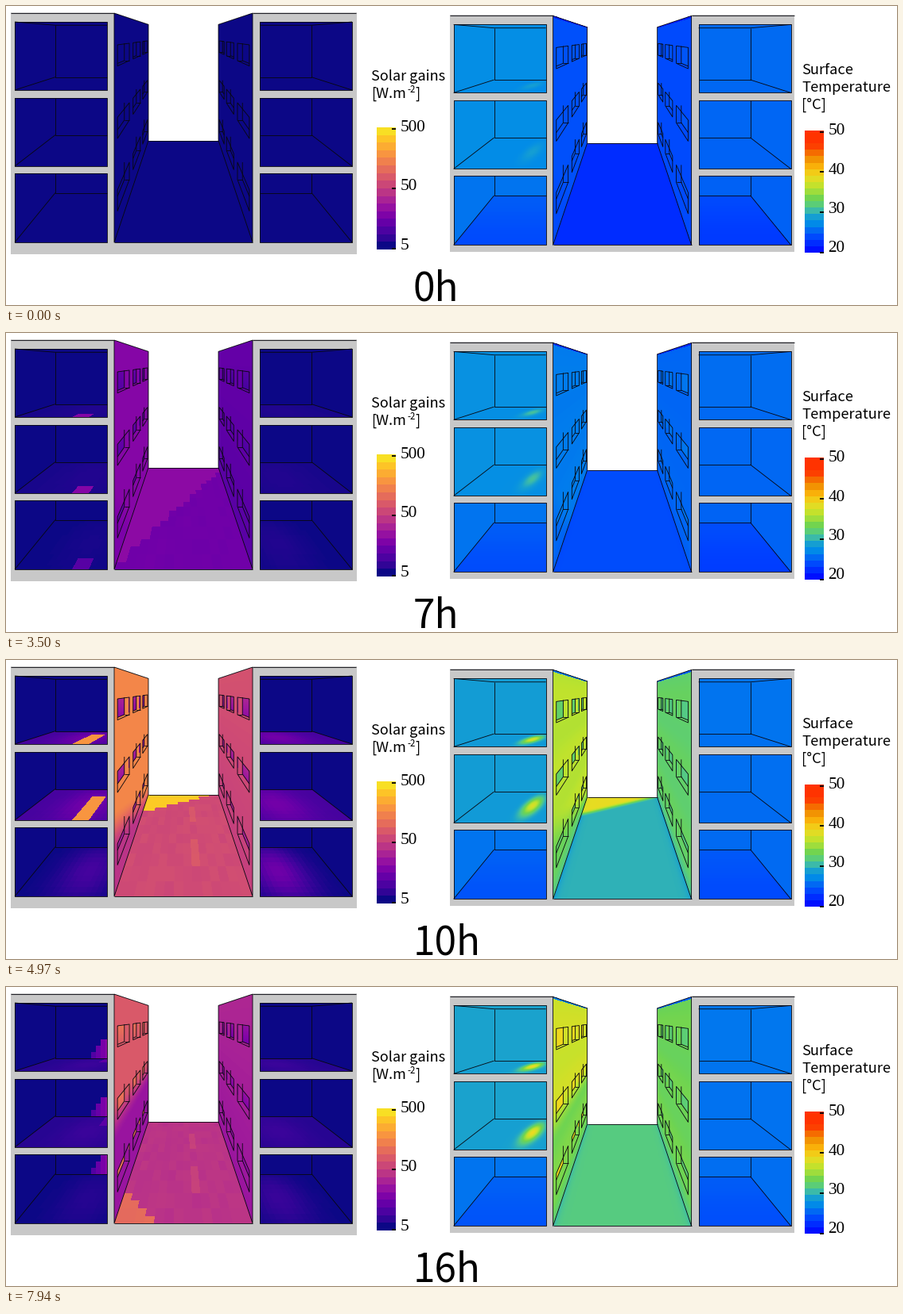
These frames come from a looping animation (1120 px wide and 377 px high, 8000 ms). A matplotlib script:

```python
import numpy as np
import matplotlib.pyplot as plt
from matplotlib.animation import FuncAnimation
from matplotlib.collections import LineCollection
from matplotlib.colors import LinearSegmentedColormap

W, H, DPI = 1120, 377, 100
STEP, LOOP = 20, 8000
# The hours advance in an uneven short/long rhythm
CHANGES = np.cumsum([530, 460] * 4 + [460, 550] + [460, 530] * 3)
SHIFT = (551.6, 3.4)                 # right panel relative to the left one
GRAY = (0.785, 0.785, 0.785)
INK = (0.03, 0.03, 0.06)

# One-point perspective: vanishing point, street half width and depths
VX, VY = 223, 38
HALF, GROUND, ROOF = 87, 260, -29
FAR, ROOM_FAR = 1.976, 1.316
IN, OUT = 96, 212                    # room sides measured from the centre
WINDOWS = [(1.05 + 0.325 * i, 1.28 + 0.325 * i) for i in range(3)]
WIN_TOP, WIN_H, RECESS, STOREY = 11.5, 28, 95, 96

SOLAR_BANDS = 16
plasma = plt.get_cmap("plasma")
thermal = LinearSegmentedColormap.from_list("thermal", [
    (0, "#0005ff"), (.12, "#0045ff"), (.24, "#028ce8"), (.295, "#17a0d1"),
    (.345, "#3bbaab"), (.39, "#57cc80"), (.45, "#6ed452"), (.55, "#bde32e"),
    (.64, "#eddb21"), (.72, "#fab50a"), (.8, "#f08a00"), (.91, "#ff3300"),
    (1, "#ff3300")], 512)

# Geometry on the pixel grid of one panel
X, Y = np.meshgrid(np.arange(435) + 6.5, np.arange(305) + 8.5)
DX = np.maximum(abs(X - VX), 0.5)
LEFT = X < VX

wall_z = HALF / DX
wall_y = (Y - VY) * wall_z
WALL = (DX < HALF) & (wall_z < FAR) & (wall_y > ROOF) & (wall_y < GROUND)

street_z = GROUND / np.maximum(Y - VY, 1)
street_u = (X - VX) * street_z / HALF
STREET = (abs(street_u) < 1) & (street_z > 1) & (street_z < FAR)


def window_mask(depth):
    z = depth / DX
    y = (Y - VY) * z
    in_z = np.any([(z > a) & (z < b) for a, b in WINDOWS], axis=0)
    return in_z & (y > 0) & ((y - WIN_TOP) % STOREY < WIN_H)


PANE = WALL & window_mask(HALF) & window_mask(RECESS)


class Room:
    def __init__(self, storey):
        self.storey = storey
        self.top, self.bottom = 20 + 95.5 * storey, 106 + 96 * storey
        depth = self.bottom - VY
        self.back = VY + depth / ROOM_FAR
        self.z = depth / np.maximum(Y - VY, 1)
        self.r = DX * self.z
        self.box = (DX > IN) & (DX < OUT) & (Y > self.top) & (Y < self.bottom)
        self.floor = self.box & (self.z < ROOM_FAR) & (self.r < OUT)


ROOMS = [Room(k) for k in range(3)]
INDOORS = np.any([room.box for room in ROOMS], axis=0)
SKY = (DX < HALF) & ~WALL & ~STREET & (Y < VY + GROUND)
NOISE = np.random.default_rng(4).uniform(-1, 1, (64, 64))


def snap(a, step):
    return np.floor(a / step) * step + step / 2


def cell_noise(a, b, da, db):
    return NOISE[np.floor(a / da).astype(int) % 64,
                 np.floor(b / db).astype(int) % 64]


def smooth(a):
    a = np.clip(a, 0, 1)
    return a * a * (3 - 2 * a)


def blob(a, b):
    return np.exp(-(a * a + b * b))


def dawn(hour):
    return np.clip((hour - 6) / 2, 0, 1)


def arc(hour, noon, drop):
    """Daylight level: a parabola around midday, zero before dawn."""
    return dawn(hour) * (noon - drop * ((hour - 11.6) / 4) ** 2)


def heat(hour, peak=13.2, width=5.5):
    """Stored warmth, rising after sunrise and peaking past noon."""
    rise = np.clip((hour - 5.6) / 2.4, 0, 1)
    return rise * np.exp(-((hour - peak) / width) ** 2)


def sun_edge(hour, u):
    """Depth beyond which the street is sunlit."""
    t = hour - 8
    return 1.25 + .225 * t + max(.05, .345 - .1 * t) * (u + 1)


def wall_shade(hour):
    """0 on the sunny upper part of the left wall, 1 in its lower shade."""
    slope = 300 * np.exp(-.6 * max(0, hour - 8))
    start = 150 - 45 * smooth((hour - 14) / 2) + slope * (wall_z - 1)
    return smooth((wall_y - start) / 55)


def solar(hour):
    v = np.zeros_like(X)
    on = dawn(hour)
    evening = smooth((hour - 14) / 2)

    u, z = snap(street_u, 1 / 7), snap(street_z, .045)
    street = arc(hour, .56, .08) \
        + .012 * on * cell_noise(street_u, street_z, 1 / 7, .09)
    streak = (abs(u - .22) < .08) & (np.sin(street_z * 16) > -.1)
    street = street + .05 * streak * smooth((hour - 8) / 2)
    lit = on * min(.95, .73 + .11 * (hour - 8))
    street = np.where(z > sun_edge(hour, u), lit, street)
    corner = (u + 1) / .65 + (z - 1) / .2 < 1
    street = street + .2 * corner * smooth(hour - 15)
    v[STREET] = street[STREET]

    high, low = arc(hour, .78, .15), on * (.5 - .019 * (hour - 8))
    left = high + (low - high) * wall_shade(hour)
    right = arc(hour, .56, .15) + .06 * on * (.5 - wall_y / GROUND)
    v[WALL] = np.where(LEFT, left, right)[WALL]
    pane = np.where(LEFT, on * (.35 + .3 * smooth((hour - 12) / 4)),
                    arc(hour, .37, .07))
    pane = pane + .1 * on * (.5 - ((wall_y - WIN_TOP) % STOREY) / WIN_H)
    v[PANE] = pane[PANE]

    # The sunbeam through each window drifts backwards after 10h
    drift = max(0, hour - 10) / 6
    near, outer = 1 + .2 * drift ** 2, 140 - 13 * drift
    far = 1.22 + .08 * drift - .055 * max(0, 10 - hour)
    base = arc(hour, .26, .14)
    for room in ROOMS:
        ground = room.storey == 2
        r, z = snap(room.r, 7), snap(room.z, .03)
        spread = blob((r - 135) / 38, (z - 1.14) / .17)
        floor = base * (.5 + .5 * spread)
        if ground:
            floor = base * spread * np.where(LEFT, .5, .95)
        beam = (room.z > near) & (room.z < far) & LEFT \
            & (abs(room.r - outer + 10.5) < 10.5)
        level = arc(hour, .83, .2) * (1 - .7 * evening)
        if ground:
            level = .33 * on * (1 - smooth((hour - 8) / 2))
        floor = np.where(beam, np.maximum(floor, level), floor)
        v[room.floor] = floor[room.floor]
        # Stepped afternoon glow on the back wall
        up = np.floor((room.back - Y) / 8)
        steps = room.box & (up >= 0) & (up < 3) & LEFT & (X > 107 + 6 * up)
        glow = .28 * smooth((hour - 12.5 - 1.5 * ground) / 2)
        v[steps] = (glow * (.45 + snap(X - 107, 6) / 32))[steps]
    return np.clip(v, 0, .999)


def temperature(hour):
    v = np.zeros_like(X)
    night = .03 * np.exp(-hour / 3)
    warm = heat(hour)

    street = .045 + night + .38 * heat(hour, 13.8, 7)
    lit = np.clip(.05 + .125 * (hour - 8), 0, .3)
    street = street + lit * smooth(
        (street_z - sun_edge(hour, street_u)) / .1 + .5)
    street = street - .06 * warm * np.exp(-(1 - abs(street_u)) / .05)
    v[STREET] = street[STREET]

    high, low = .11 + night + .61 * warm, .1 + night + .47 * warm
    left = high + (low - high) * wall_shade(hour)
    right = .1 + night + .45 * warm
    wall = np.where(LEFT, left, right)
    wall = wall + .015 * warm * np.sin(wall_y / STOREY * 2 * np.pi + 1)
    wall = wall - .06 * warm * smooth((wall_y - 235) / 25)
    wall = np.where(wall_y < ROOF + 3, wall * .4, wall)
    v[WALL] = wall[WALL]
    pane = .15 + np.where(LEFT, .5 * heat(hour, 15.5, 7), .33 * warm)
    v[PANE] = pane[PANE]

    for room in ROOMS:
        ground = room.storey == 2
        gain = .06 * heat(hour, 14, 6)
        base = np.where(LEFT, .2 if ground else .247 + gain,
                        .185 - .008 * room.storey + .4 * gain)
        v[room.box] = base[room.box]
        spot = blob((room.r - 130) / 11, (room.z - 1.15) / .09)
        floor = base - .006
        if ground:
            floor = base - (.04 + .03 * smooth((1.3 - room.z) / .3)) \
                * (1 - .3 * warm)
        else:
            floor = floor + LEFT * spot * (.05 + .38 * warm)
        v[room.floor] = floor[room.floor]
    return np.clip(v, 0, 1)


def solar_color(v):
    return plasma(v * .94)


def shade(values, cmap):
    rgb = cmap(values)[..., :3]
    rgb[~(INDOORS | WALL | STREET)] = GRAY
    rgb[SKY] = 1
    return rgb


def project(x, y, z=1.0):
    return VX - x / z, VY + y / z


def panel_lines():
    """Edges of the left half, then their mirror image."""
    p = project
    half = [[(6, 8.5), (136, 8.5)],
            [p(HALF, ROOF), p(HALF, ROOF, FAR), p(HALF, GROUND, FAR),
             p(HALF, GROUND), p(HALF, ROOF)]]
    xb = VX - OUT / ROOM_FAR
    for room in ROOMS:
        t, b, back = room.top, room.bottom, room.back
        ceiling = max(t, VY + (t - VY) / ROOM_FAR) if t < VY else t
        half += [[(11, t), (127, t), (127, b), (11, b), (11, t)],
                 [(xb, ceiling), (xb, back), (127, back)],
                 [(11, b), (xb, back)]]
        if t < VY:
            half.append([(11, t), (xb, ceiling), (127, ceiling)])
        top = WIN_TOP + STOREY * room.storey
        sill = top + WIN_H
        for a, c in WINDOWS:
            half += [[p(HALF, top, a), p(HALF, top, c), p(HALF, sill, c),
                      p(HALF, sill, a), p(HALF, top, a)],
                     [p(RECESS, top, c), p(RECESS, sill, c),
                      p(RECESS, sill, a * RECESS / HALF)],
                     [p(RECESS, sill, c), p(HALF, sill, c)]]
    mirrored = [[(2 * VX - x, y) for x, y in line] for line in half]
    return half + mirrored + [[p(HALF, GROUND, FAR), p(-HALF, GROUND, FAR)],
                              [p(HALF, GROUND), p(-HALF, GROUND)]]


fig = plt.figure(figsize=(W / DPI, H / DPI), dpi=DPI, facecolor="white")
ax = fig.add_axes([0, 0, 1, 1])
ax.axis("off")


def picture(rgb, x, y, w, h):
    return ax.imshow(rgb, extent=(x, x + w, y + h, y), aspect="auto",
                     interpolation="nearest")


def label(x, y, text, px, font="Noto Sans CJK JP"):
    return ax.text(x, y, text, fontsize=px * 72 / DPI, family=font,
                   color="black", va="baseline")


def colorbar(x, y, colors, names, spacing):
    """Bar with its tick labels listed from the top downwards."""
    picture(colors[::-1, None, :3], x, y, 24, 154)
    for i, name in enumerate(names):
        mark = y + 1.5 + spacing * i
        ax.plot([x + 19, x + 24], [mark, mark], color="black", lw=1.3,
                solid_capstyle="butt")
        label(x + 29.5, y + 5 + (spacing - 1.2) * i, name, 21.3,
              "Liberation Serif")


solar_img = picture(np.ones((305, 435, 3)), 6, 8, 435, 305)
temp_img = picture(np.ones((299, 433, 3)), 558, 11, 433, 299)

edges = panel_lines()
shifted = [[(min(x + SHIFT[0], 991), y + SHIFT[1]) for x, y in line]
           for line in edges]
ax.add_collection(LineCollection(edges + shifted, colors=[INK],
                                 linewidths=.62))

colorbar(466, 153, solar_color(np.linspace(0, 1, SOLAR_BANDS)),
         ["500", "50", "5"], 75.5)
colorbar(1004, 157, thermal(np.linspace(.02, 1, 19)),
         ["50", "40", "30", "20"], 50.7)

label(459, 94, "Solar gains", 18.1)
label(459, 115.5, "[W.m", 18.1)
label(504, 109, "-2", 11.5)
label(514.5, 115.5, "]", 18.1)
for row, line in enumerate(["Surface", "Temperature", "[°C]"]):
    label(1000, 85.5 + 22.3 * row, line, 18.3)
clock = label(512, 371.5, "0h", 49.5)

ax.set_xlim(0, W)
ax.set_ylim(H, 0)

VIEWS = [(shade(solar(h), solar_color),
          shade(temperature(h), thermal)[:299, :433])
         for h in range(len(CHANGES) + 1)]


def update(frame):
    hour = int(np.searchsorted(CHANGES, (frame + .5) * STEP, side="right"))
    solar_img.set_data(VIEWS[hour][0])
    temp_img.set_data(VIEWS[hour][1])
    clock.set_text(f"{hour}h")
    return solar_img, temp_img, clock


anim = FuncAnimation(fig, update, frames=LOOP // STEP, interval=STEP,
                     repeat=True, repeat_delay=0, init_func=lambda: update(0))
plt.show()
```
